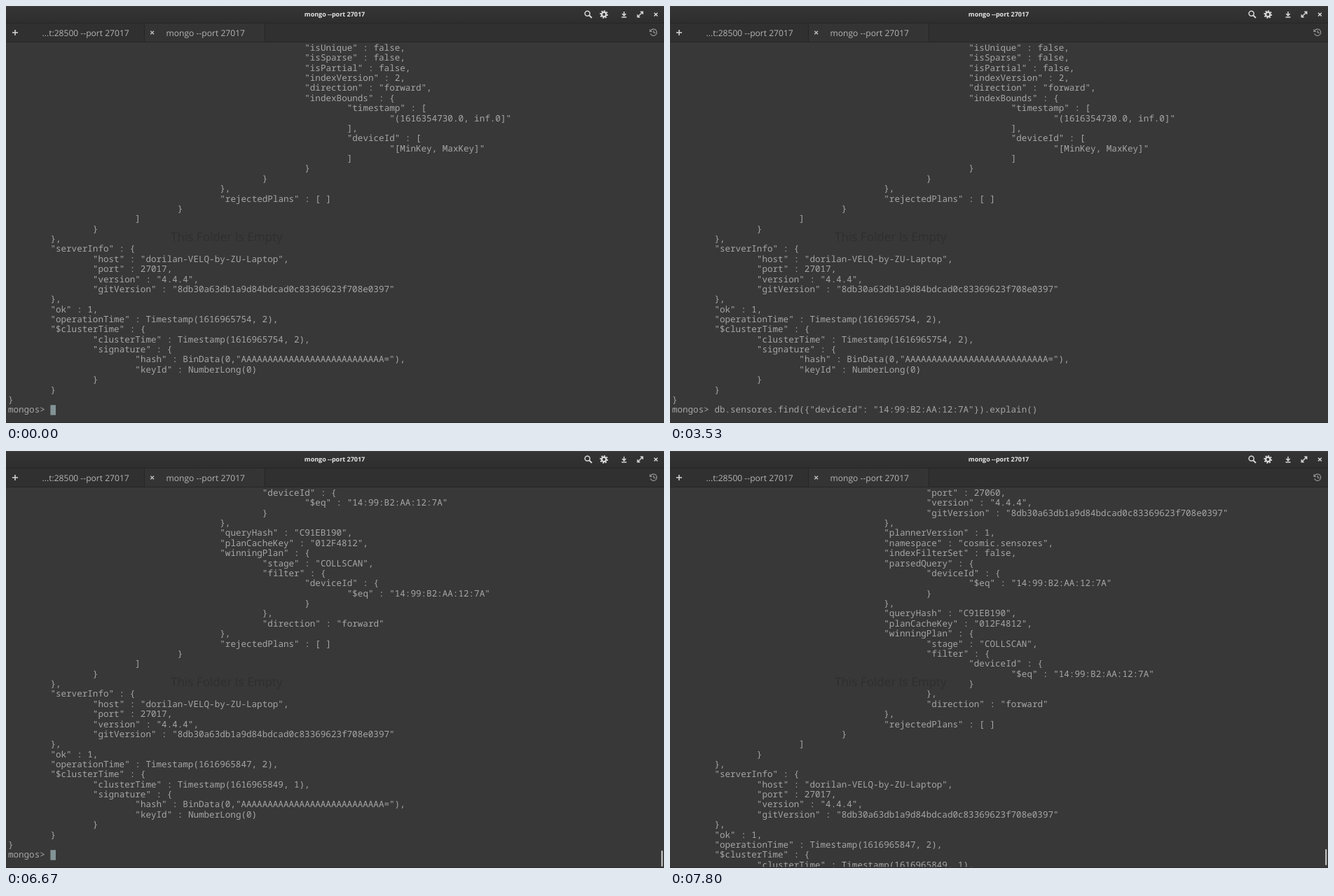
An HTML page that plays this animation: 939x596 px, repeating every 8 s.

```html
<!DOCTYPE html>
<html lang="en">
<head>
<meta charset="utf-8">
<title>Terminal</title>
<style>
  html, body { margin: 0; width: 100%; height: 100%; overflow: hidden; background: #383838; }
  svg { display: block; width: 939px; height: 596px; text-rendering: geometricPrecision; }
  .ui { font-family: "Open Sans", "Noto Sans", sans-serif; }
  .term { font: 12.6px "Roboto Mono", "Noto Sans Mono", monospace; fill: #a6a6a6; }
  .icon { fill: none; stroke: #d8d8d8; stroke-width: 1.5; }
</style>
</head>
<body>
<svg viewBox="0 0 939 596">
  <defs>
    <linearGradient id="bar" x2="0" y2="1">
      <stop offset="0" stop-color="#353535"/>
      <stop offset="1" stop-color="#2e2e2e"/>
    </linearGradient>
    <clipPath id="view"><rect y="52" width="939" height="542.5"/></clipPath>
  </defs>
  <rect width="939" height="596" fill="#383838"/>

  <rect width="939" height="24" fill="url(#bar)"/>
  <rect y="24" width="939" height="28" fill="#303030"/>
  <rect x="198" y="24" width="171" height="28" fill="#343434"/>
  <path d="M0 24.5H939M0 51.5H939M197.5 25V51M369.5 25V51" stroke="#262626"/>
  <path d="M0 .5H939" stroke="#414141"/>
  <g class="ui">
    <text x="469" y="15.3" font-size="9" font-weight="700" text-anchor="middle" fill="#e6e6e6">mongo --port 27017</text>
    <g font-size="12.1" fill="#b4b4b4">
      <text x="51.5" y="43">...t:28500 --port 27017</text>
      <text x="228.5" y="43">mongo --port 27017</text>
    </g>
    <text x="235" y="336" font-size="17.1" fill="#2f2f2f">This Folder Is Empty</text>
  </g>

  <g class="icon">
    <circle cx="829.7" cy="10.8" r="3.5"/>
    <path d="M832.3 13.4L836 17" stroke-width="2"/>
    <circle cx="853.3" cy="12" r="3.2" stroke-width="2.4"/>
    <circle cx="853.3" cy="12" r="4.9" stroke-width="2" pathLength="16" stroke-dasharray="1"/>
    <path d="M882 8V13.5M879.3 11L882 13.8L884.7 11M878.5 16H885.5"/>
    <path d="M902 15L908 9M905.3 8.3H908.7V11.7M901.3 12.3V15.7H904.7"/>
    <path d="M925 9.7L929.8 14.5M929.8 9.7L925 14.5"/>
    <path d="M9 38H17M13 34V42"/>
    <path d="M206.3 35.7L211 40.4M211 35.7L206.3 40.4" stroke="#b4b4b4"/>
    <path d="M919.8 35.6A4.7 4.7 0 1 1 919.6 39.4M919 33.5V36.5H922M924.3 35V38.3H927" stroke="#a0a0a0" stroke-width="1.1"/>
  </g>

  <g clip-path="url(#view)">
    <g id="screen" class="term">
      <rect id="cursor" y="570.3" width="7.6" height="14.4" fill="#839496"/>
    </g>
  </g>
  <rect id="thumb" x="935.2" y="571" width="2" height="23" rx="1" fill="#d0d0d0"/>
  <path d="M0 595.5H939" stroke="#2d2d2d"/>
</svg>
<script>
const LOOP = 8000, LEFT = 2.9, CHAR = 7.56, ROW = 14.37, BASE = 64;
const PROMPT_ROW = 36;
const PASTE = 930, RUN = 4170;
const BLINKS = [30, 570, 1170, 1730, 2330, 2970, 3530, 4170, 4800, 5430, 6070, 6670];
const COMMAND = 'db.sensores.find({"deviceId": "14:99:B2:AA:12:7A"}).explain()';
const GIT = '"gitVersion" : "8db30a63db1a9d84bdcad0c83369623f708e0397"';

// The leading digit of each line is its tab depth.
const ending = (operation, cluster) => `5"rejectedPlans" : [ ]
4}
3]
2}
1},
1"serverInfo" : {
2"host" : "dorilan-VELQ-by-ZU-Laptop",
2"port" : 27017,
2"version" : "4.4.4",
2${GIT}
1},
1"ok" : 1,
1"operationTime" : Timestamp(${operation}),
1"$clusterTime" : {
2"clusterTime" : Timestamp(${cluster}),
2"signature" : {
3"hash" : BinData(0,"${'A'.repeat(27)}="),
3"keyId" : NumberLong(0)
2}
1}
0}
0mongos>`;

const indexScan = `7"isUnique" : false,
7"isSparse" : false,
7"isPartial" : false,
7"indexVersion" : 2,
7"direction" : "forward",
7"indexBounds" : {
8"timestamp" : [
9"(1616354730.0, inf.0]"
8],
8"deviceId" : [
9"[MinKey, MaxKey]"
8]
7}
6}
5},
` + ending('1616965754, 2', '1616965754, 2');

const collectionScan = `6"port" : 27060,
6"version" : "4.4.4",
6${GIT}
5},
5"plannerVersion" : 1,
5"namespace" : "cosmic.sensores",
5"indexFilterSet" : false,
5"parsedQuery" : {
6"deviceId" : {
7"$eq" : "14:99:B2:AA:12:7A"
6}
5},
5"queryHash" : "C91EB190",
5"planCacheKey" : "012F4812",
5"winningPlan" : {
6"stage" : "COLLSCAN",
6"filter" : {
7"deviceId" : {
8"$eq" : "14:99:B2:AA:12:7A"
7}
6},
6"direction" : "forward"
5},
` + ending('1616965847, 2', '1616965849, 1');

const byId = id => document.getElementById(id);
const screen = byId('screen'), cursor = byId('cursor'), thumb = byId('thumb');
const columnX = column => LEFT + column * CHAR;

function add(parent, name, attributes = {}, text = '') {
  const node = document.createElementNS('http://www.w3.org/2000/svg', name);
  for (const key in attributes) node.setAttribute(key, attributes[key]);
  node.textContent = text;
  return parent.appendChild(node);
}

function addLine(parent, row, column, text) {
  return add(parent, 'text', { x: columnX(column), y: BASE + row * ROW }, text);
}

// Lays out an output so that its last line sits on the prompt row.
function addOutput(source) {
  const group = add(screen, 'g');
  const lines = source.split('\n');
  const first = PROMPT_ROW + 1 - lines.length;
  lines.forEach((line, i) => {
    const row = first + i;
    const node = addLine(group, row, line[0] * 8, line.slice(1));
    node.dataset.row = row;
  });
  return group;
}

const before = addOutput(indexScan);
const after = addOutput(collectionScan);
const command = addLine(screen, PROMPT_ROW, 8, COMMAND);

const show = (node, visible) => node.setAttribute('display', visible ? 'inline' : 'none');
const ramp = (t, start) => Math.min(1, Math.max(0, (t - start) / 500));

function render(t) {
  const typed = t >= PASTE && t < RUN;
  const scroll = t < 7070 ? 0 : t < 7530 ? 4 : 8;

  show(before, t < RUN);
  show(after, t >= RUN);
  show(command, typed);
  for (const line of after.children) show(line, +line.dataset.row + scroll >= 0);
  screen.setAttribute('transform', `translate(0 ${scroll * ROW})`);

  cursor.setAttribute('x', columnX(typed ? 8 + COMMAND.length : 8));
  show(cursor, BLINKS.filter(time => time <= t).length % 2 === 0);

  thumb.setAttribute('y', 571 - scroll * 0.25);
  thumb.setAttribute('opacity', ramp(t, 30) - ramp(t, 2000) + ramp(t, RUN));
}

function tick() {
  render(performance.now() % LOOP);
  requestAnimationFrame(tick);
}
tick();
</script>
</body>
</html>
```
